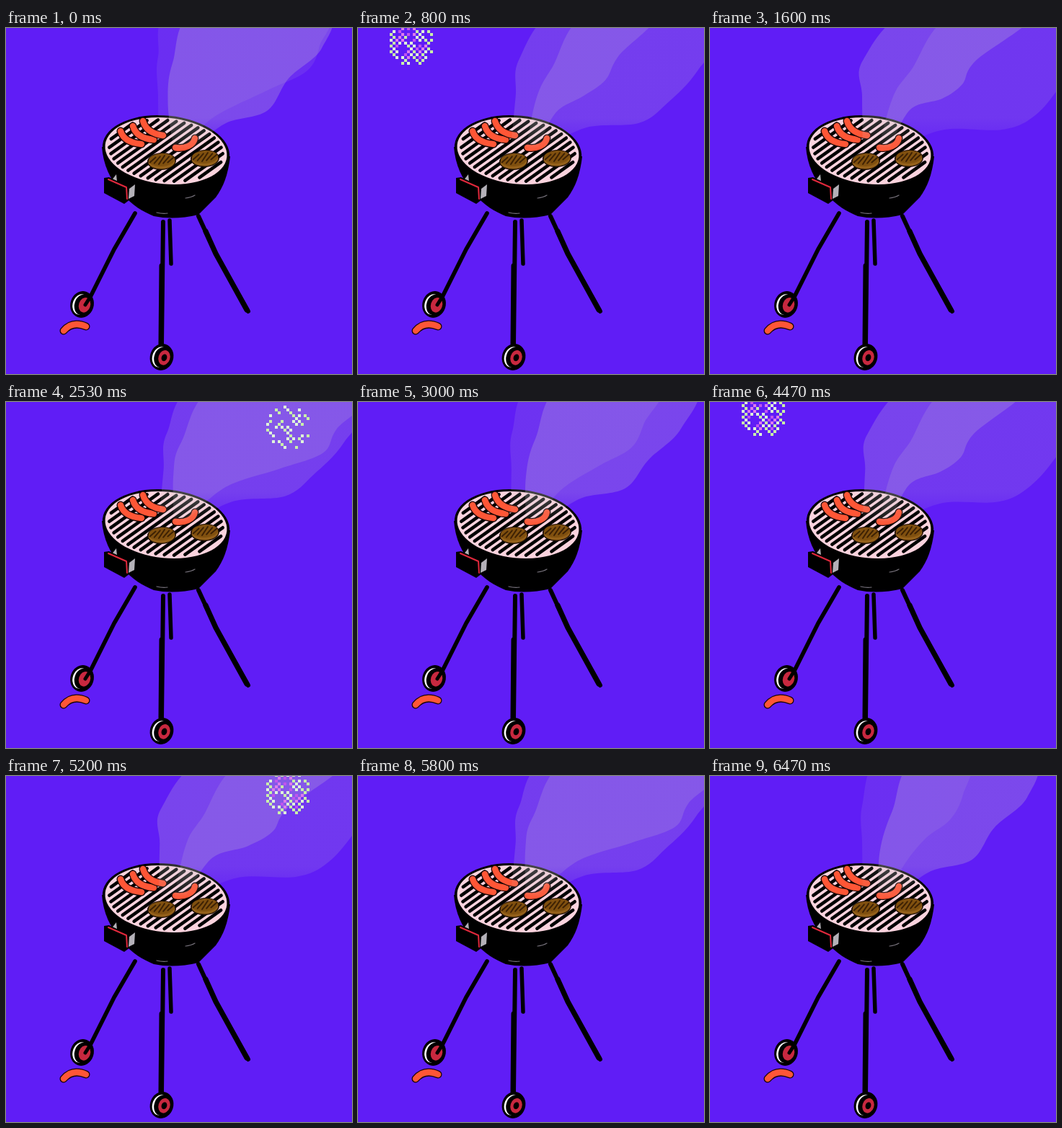
Recreate the animation shown at these times as an HTML page with a canvas. Size 480 by 480 pixels, loop 6540 ms.

```html
<!DOCTYPE html>
<html lang="en">
<head>
<meta charset="utf-8">
<title>Barbecue</title>
<style>
html, body { margin: 0; width: 100%; height: 100%; overflow: hidden; background: #601df6; }
canvas { display: block; width: 100vw; height: 100vh; }
</style>
</head>
<body>
<canvas id="stage" width="480" height="480"></canvas>
<script>
const LOOP = 6540, STEP = LOOP / 98, SWAY = LOOP / 2;
const BG = '#601df6', PINK = '#fbd3de', ORANGE = '#ff5636', RED = '#c8283f';
const stage = document.getElementById('stage').getContext('2d');
const still = document.createElement('canvas');
still.width = still.height = 480;
const g = still.getContext('2d');
g.lineCap = g.lineJoin = 'round';

function line(d, color, width) {
  g.strokeStyle = color;
  g.lineWidth = width;
  g.stroke(new Path2D(d));
}

function fill(d, color) {
  g.fillStyle = color;
  g.fill(new Path2D(d));
}

function oval(x, y, rx, ry, tilt, color) {
  g.beginPath();
  g.ellipse(x, y, rx, ry, tilt, 0, Math.PI * 2);
  g.fillStyle = color;
  g.fill();
}

function sausage(d) {
  line(d, '#1a0505', 11);
  line(d, ORANGE, 8.4);
}

// Bars are chords of a tilted ellipse inside the rim.
function bars() {
  const cx = 222, cy = 170, rx = 79, ry = 42, tilt = 0.1, slope = -0.62, pitch = 8.2;
  const c = Math.cos(tilt), s = Math.sin(tilt);
  const unit = (x, y) => [(x * c + y * s) / rx, (y * c - x * s) / ry];
  const dx = Math.cos(slope), dy = Math.sin(slope);
  for (let k = -9; k <= 9; k++) {
    const ox = -dy * k * pitch, oy = dx * k * pitch;
    const [px, py] = unit(ox, oy), [ux, uy] = unit(dx, dy);
    const a = ux * ux + uy * uy, b = px * ux + py * uy;
    const disc = b * b - a * (px * px + py * py - 1);
    if (disc <= 0) continue;
    const end = sign => {
      const r = (-b + sign * Math.sqrt(disc)) / a;
      return `${cx + ox + dx * r} ${cy + oy + dy * r}`;
    };
    line(`M${end(-1)}L${end(1)}`, '#000', 4.6);
  }
}

function patty(x, y) {
  oval(x, y + 1, 20, 12, -0.05, '#1c0d02');
  oval(x, y + 1.5, 18.4, 10, -0.05, '#94601a');
  oval(x, y - 1, 18, 9, -0.05, '#80500f');
  for (let k = -2; k <= 2; k++) {
    const mx = x + k * 6.2, h = 6 - Math.abs(k) * 1.3;
    line(`M${mx - 4} ${y + h - 1}L${mx + 4} ${y - h - 1}`, '#3d2104', 2);
  }
}

function wheel(x, y) {
  oval(x, y, 16.2, 18.6, 0.3, '#000');
  oval(x - 2, y, 11, 14.5, 0.3, '#fff');
  oval(x + 0.6, y + 0.4, 11, 14.5, 0.3, '#000');
  oval(x + 3.5, y + 0.8, 8, 10.5, 0.3, RED);
}

function drawGrill() {
  g.fillStyle = BG;
  g.fillRect(0, 0, 480, 480);

  // Legs
  line('M227 267L229 327', '#000', 5.5);
  line('M179 257L150 307L117 373', '#000', 5.6);
  line('M218 269L216 438', '#000', 6);
  line('M216 330L215 438', '#000', 7);
  line('M267 261L291 313L336 393', '#000', 6);
  line('M277 282L291 313L334 391', '#000', 7.2);

  wheel(105.5, 383.5);
  line('M117 373L110 384', '#000', 5);
  wheel(216, 456.5);
  oval(219.5, 457.3, 3.8, 5, 0.3, '#000');

  // Bowl and rack
  fill('M133 165C135 190 144 209 160 229C175 246 190 255 205 261Q233 267 267 259L291 235C301 221 308 205 311 178Z', '#000');
  oval(222, 171, 88.5, 49.5, 0.1, '#000');
  oval(222, 170.5, 84.8, 46, 0.1, PINK);
  bars();
  line('M209 256Q217 258 224 257', '#77727c', 1.2);
  line('M249 236Q257 235 262 232', '#77727c', 1.2);

  // Handle
  fill('M146 212L153 203L154 213Z', '#b4b1b8');
  fill('M136 208L143 207L171 220L172 238L164 244L136 229Z', '#000');
  fill('M171 223L179 217L178 233L170 237Z', '#b4b1b8');
  line('M142 210L167 221L168 237', '#e0283c', 2);

  // Food
  sausage('M159 143Q164 159 188 161');
  sausage('M176 136Q181 153 205 155');
  sausage('M190 129Q195 146 218 149');
  sausage('M235 166C248 168 260 163 262 153');
  patty(216, 184);
  patty(276, 180);
  sausage('M80 420Q92 406 111 414');
}

// Each layer leans between two outlines: three points up the left, five down the right.
const BACK = {
  narrow: [[211, 95], [211, 40], [236, -25], [352, -25], [350, 25], [332, 60], [298, 86], [268, 125]],
  wide: [[211, 95], [212, 45], [282, -25], [450, -25], [368, 46], [350, 78], [322, 98], [278, 113]],
  base: [[212, 165], [250, 165]], gust: [0, 98], alpha: [0.1, 0.24]
};
const FRONT = {
  narrow: [[235, 105], [252, 48], [288, -25], [440, -25], [438, 28], [392, 70], [362, 115], [305, 132]],
  wide: [[253, 98], [278, 60], [350, -25], [560, -25], [490, 75], [450, 122], [405, 141], [325, 141]],
  base: [[233, 170], [262, 165]], gust: [-24, 0], alpha: [0.26, 0.15]
};
const mix = (a, b, f) => a + (b - a) * f;

function smoke(layer, p) {
  const lean = Math.sin(Math.PI * p) ** 1.2;
  const billow = 12 * Math.sin(2 * Math.PI * p) ** 2;
  const gust = Math.max(0, Math.sin(Math.PI * (p - 0.56) / 0.42));
  const edge = layer.narrow.map(([x, y], i) => {
    const [wx, wy] = layer.wide[i], right = i > 2;
    const ny = mix(y, wy, lean);
    const high = Math.max(0, Math.min(1, (140 - ny) / 70));
    const push = layer.gust[+right] * gust + (layer === BACK && !right ? billow : 0);
    return [mix(x, wx, lean) + push * high, ny];
  });
  const pts = [layer.base[0], ...edge, layer.base[1]], last = pts.length - 1;
  stage.beginPath();
  stage.moveTo(...pts[0]);
  for (let i = 0; i < last; i++) {
    const a = pts[i], b = pts[i + 1];
    const before = pts[Math.max(0, i - 1)], after = pts[Math.min(last, i + 2)];
    stage.bezierCurveTo(
      a[0] + (b[0] - before[0]) / 6, a[1] + (b[1] - before[1]) / 6,
      b[0] - (after[0] - a[0]) / 6, b[1] - (after[1] - a[1]) / 6, b[0], b[1]);
  }
  const fade = stage.createLinearGradient(0, 125, 0, 180);
  fade.addColorStop(0, `rgba(204,200,206,${mix(...layer.alpha, lean)})`);
  fade.addColorStop(1, 'rgba(204,200,206,0)');
  stage.fillStyle = fade;
  stage.fill();
}

const BURSTS = [{ x: 74, at: 330 }, { x: 391, at: 1830 }, { x: 74, at: 4070 }, { x: 391, at: 4700 }];
const LIFE = 900, CELL = 4;

function noise(i, j) {
  const v = Math.sin(i * 127.1 + j * 311.7) * 43758.5453;
  return v - Math.floor(v);
}

// Sparks sit on a checkerboard disc that opens, sinks and thins to green.
function burst(x, age) {
  const y = 14 + 21 * Math.max(0, (age - 350) / 350);
  const reach = 7.8 * (1 - (1 - Math.min(1, age / 330)) ** 2);
  const young = age < 600;
  const keep = young ? 0.8 : 0.45 * Math.min(1, (LIFE - age) / 200);
  for (let i = -8; i <= 8; i++) {
    for (let j = -8; j <= 8; j++) {
      const d = Math.hypot(i, j), n = noise(i, j);
      if ((i + j) & 1 || d > reach || n > keep) continue;
      const pink = young && d < 6 && n > 0.35;
      stage.fillStyle = pink ? (n > 0.6 ? '#c055ee' : '#dd7cec') : (n < 0.2 ? '#dff5da' : '#c9f0a8');
      stage.fillRect(Math.round(x + i * CELL - 2), Math.round(y + j * CELL - 2), CELL, CELL);
    }
  }
}

function draw(now) {
  const t = Math.floor((now % LOOP + 7) / STEP) % 98 * STEP;
  const phase = t % SWAY / SWAY;
  stage.drawImage(still, 0, 0);
  smoke(BACK, phase);
  smoke(FRONT, phase);
  for (const { x, at } of BURSTS) {
    if (t >= at && t < at + LIFE) burst(x, t - at);
  }
}

drawGrill();
let begin;
function tick(now) {
  if (begin === undefined) begin = now;
  draw(now - begin);
  requestAnimationFrame(tick);
}
draw(0);
requestAnimationFrame(tick);
</script>
</body>
</html>
```
